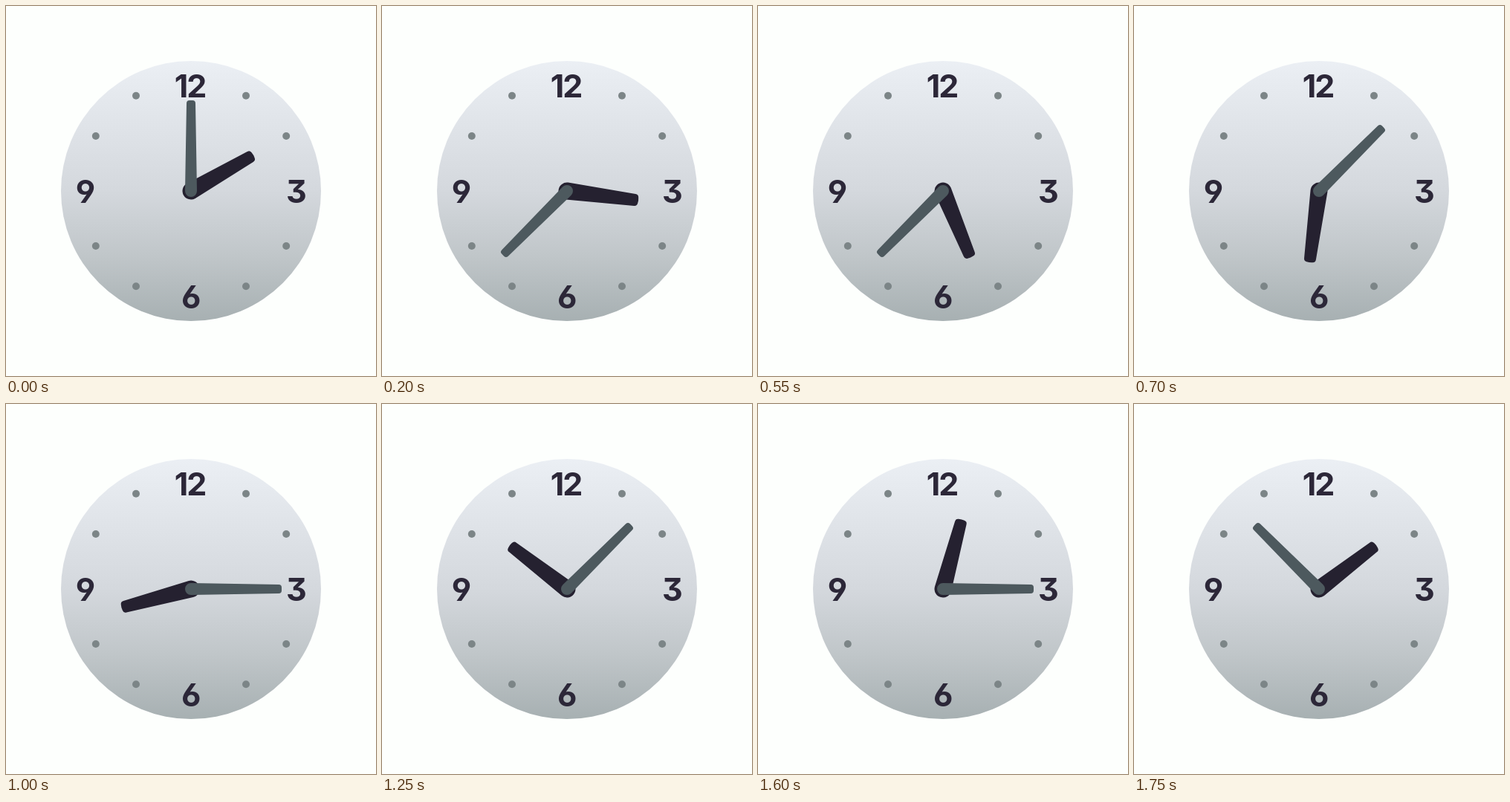
Recreate the animation shown at these times as an HTML page. Size 498 by 498 pixels, loop 1.8 s.

```html
<!DOCTYPE html>
<html lang="en">
<head>
<meta charset="utf-8">
<title>Clock</title>
<style>
  html, body { margin: 0; width: 100%; height: 100%; overflow: hidden; background: #fdfffd; }
  svg { display: block; width: 498px; height: 498px; }
  text {
    font: 700 43px Inter, Lato, sans-serif;
    font-feature-settings: "cv03", "cv04", "cv09";
    fill: #2c2738;
    text-anchor: middle;
  }
</style>
</head>
<body>
<svg viewBox="0 0 498 498">
  <defs>
    <linearGradient id="shade" x1="0" y1="0" x2="0" y2="1">
      <stop offset="0" stop-color="#ebeff4"/>
      <stop offset=".5" stop-color="#d4d8dd"/>
      <stop offset=".75" stop-color="#c0c6c9"/>
      <stop offset="1" stop-color="#a7b0b2"/>
    </linearGradient>
  </defs>
  <circle cx="249" cy="249" r="175" fill="url(#shade)"/>
  <g id="dots" fill="#7c8587"></g>
  <text x="247.5" y="123" letter-spacing="-2">12</text>
  <text x="391" y="264.5">3</text>
  <text x="249.3" y="406.5">6</text>
  <text x="107" y="264.5">9</text>
  <g transform="translate(249 249)">
    <path id="hour" fill="#252130"
      d="M-8-92Q-8-96-4-96.5Q0-97.3 4-96.5Q8-96 8-92L11.5 0A11.5 11.5 0 0 1-11.5 0Z"/>
    <path id="minute" fill="#4d595e"
      d="M-6-118Q-6-122-2-122H2Q6-122 6-118L8 0A8 8 0 0 1-8 0Z"/>
  </g>
</svg>
<script>
  const LOOP = 1800, TICK = 50;
  // Pace of the hands: [time in ms, eighth-turns of the minute hand]
  const pace = [[0, 0], [700, 17.5], [1000, 26.1], [1250, 33.2],
                [1600, 42.2], [1650, 44.1], [1750, 47.1], [1800, 48]];
  const byId = id => document.getElementById(id);
  const hour = byId('hour'), minute = byId('minute');

  for (let i = 0; i < 12; i++) {
    if (i % 3 === 0) continue;
    const a = i * Math.PI / 6;
    const dot = document.createElementNS('http://www.w3.org/2000/svg', 'circle');
    dot.setAttribute('cx', 249 + 148 * Math.sin(a));
    dot.setAttribute('cy', 249 - 148 * Math.cos(a));
    dot.setAttribute('r', 5);
    byId('dots').append(dot);
  }

  function stepsAt(t) {
    const i = pace.findIndex(p => p[0] > t);
    const [t0, s0] = pace[i - 1], [t1, s1] = pace[i];
    return Math.floor(s0 + (s1 - s0) * (t - t0) / (t1 - t0));
  }

  const turn = (el, deg) => el.setAttribute('transform', `rotate(${deg})`);

  function draw(now) {
    const t = Math.floor((now % LOOP) / TICK) * TICK;
    const n = stepsAt(t);
    turn(minute, n * 45);
    turn(hour, 60 + n * 7.5);
  }

  let start = null;
  function frame(now) {
    if (start === null) start = now;
    draw(now - start);
    requestAnimationFrame(frame);
  }
  draw(0);
  requestAnimationFrame(frame);
</script>
</body>
</html>
```
